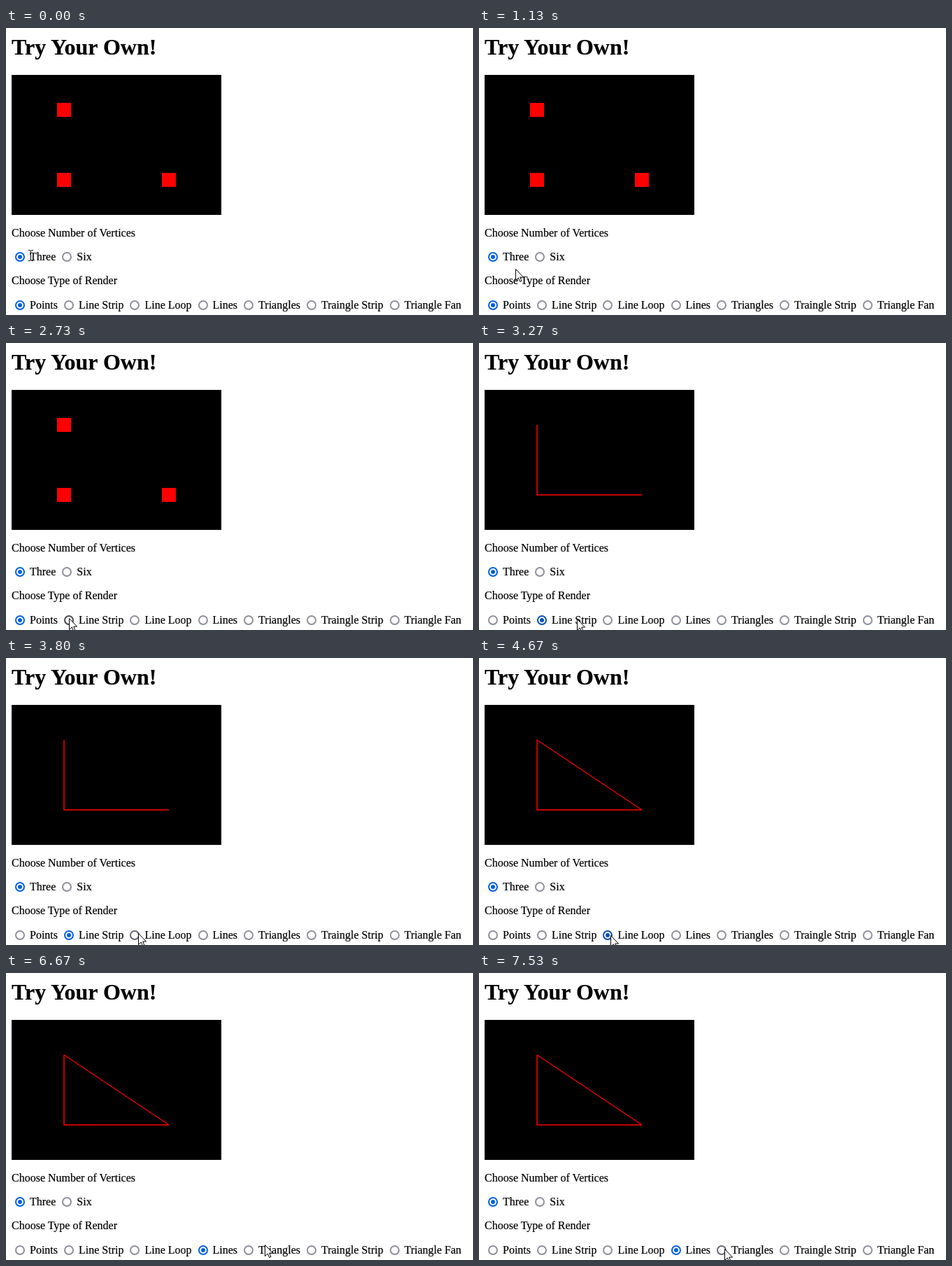
An HTML page for the animation above (8 s loop, 668 by 410 pixels).

```html
<!DOCTYPE html>
<html lang="en">
<head>
<meta charset="utf-8">
<title>Try Your Own!</title>
<style>
  html, body { margin: 0; width: 100%; height: 100%; overflow: hidden; background: #fff; }
  svg { display: block; }
  text { font: 16px "Liberation Serif", "Times New Roman", serif; stroke: #000; stroke-width: .2px; }
  .title { font-size: 32px; font-weight: bold; }
</style>
</head>
<body>
<svg id="stage" width="668" height="410" viewBox="0 0 668 410">
  <text class="title" x="8" y="38">Try Your Own!</text>
  <rect x="8" y="67" width="300" height="200"/>
  <path id="points" fill="#f00" d="M73 107h20v20h-20zM73 207h20v20h-20zM223 207h20v20h-20z"/>
  <path id="strip" fill="none" stroke="#f00" stroke-width="1.5" d="M83 117V217H233"/>
  <path id="diagonal" stroke="#f00" stroke-width="1.1" d="M83 117L233 217"/>
  <text x="8" y="298">Choose Number of Vertices</text>
  <text x="8" y="366">Choose Type of Render</text>
  <g id="radios"></g>
  <path id="beam" fill="none" stroke="#000" d="M-3 -7.5H-1Q0 -7.5 .5 -6.5Q1 -7.5 2 -7.5H4M.5 -7V7M-3 7.5H-1Q0 7.5 .5 6.5Q1 7.5 2 7.5H4"/>
  <path id="arrow" fill="#fff" stroke="#000" d="M.5 .5V16.5L4.3 12.9L6.7 18.4L9 17.4L6.7 12.1H11.6Z"/>
</svg>
<script>
const LOOP = 8000, FPS = 15;
const $ = id => document.getElementById(id);

function add(tag, attrs) {
  const node = document.createElementNS('http://www.w3.org/2000/svg', tag);
  for (const key in attrs) node.setAttribute(key, attrs[key]);
  return $('radios').appendChild(node);
}

// Inline flow: margin, 14px circle, margin, space, label, space
function radioRow(cy, labels) {
  const space = 4;
  let x = 8;
  return labels.map(label => {
    const left = x + 5, cx = Math.round(left) + 7, textX = left + 17 + space;
    const ring = add('circle', { cx, cy, r: 6, fill: '#fff', 'stroke-width': 2 });
    const dot = add('circle', { cx, cy, r: 3 });
    const text = add('text', { x: textX, y: cy + 5 });
    text.textContent = label;
    const right = textX + text.getComputedTextLength();
    x = right + space;
    return { ring, dot, left, right, cx };
  });
}

const idleColors = { idle: '#8f8f9d', hover: '#676774', press: '#484851' };
const checkedColors = { idle: '#0060df', hover: '#0250bb', press: '#054096' };

function paintRadio({ ring, dot }, checked, state) {
  const color = (checked ? checkedColors : idleColors)[state];
  ring.setAttribute('stroke', color);
  dot.setAttribute('fill', checked ? color : 'none');
}

const counts = radioRow(327, ['Three', 'Six']);
const modes = radioRow(396, [
  'Points', 'Line Strip', 'Line Loop', 'Lines', 'Triangles', 'Traingle Strip', 'Triangle Fan'
]);
const [, strip, lineLoop, lines, triangles] = modes;

// The pointer rests between moves; times are in seconds
const moves = [];
const move = (from, to, x, y) => moves.push({ from, to, x, y });
move(0.87, 1.73, strip.cx, 388);
move(1.80, 2.07, strip.cx, 393);
move(3.07, 3.27, strip.cx + 51, 394);
move(3.27, 3.53, lineLoop.cx + 7, 387);
move(3.67, 3.87, lineLoop.cx + 4, 396);
move(4.80, 5.33, lines.cx - 9, 398);
move(5.33, 5.60, lines.cx, 393);
move(6.40, 6.67, triangles.cx + 24, 388);
move(6.67, 7.27, triangles.cx + 8, 389);
move(7.27, 7.53, triangles.cx + 4, 394);

function pointerAt(t) {
  let x = 35, y = 325;
  for (const m of moves) {
    const k = Math.min(1, Math.max(0, (t - m.from) / (m.to - m.from)));
    x += (m.x - x) * k;
    y += (m.y - y) * k;
  }
  return [Math.round(x), Math.round(y)];
}

const PRESS = 2.73, CLICKS = [2.86, 4.66, 6.2];

function render(ms) {
  const t = Math.floor((ms + 4) * FPS / 1000) / FPS + 0.001;
  const [x, y] = pointerAt(t);
  const selected = CLICKS.filter(click => t >= click).length;
  const active = t >= PRESS && t < CLICKS[0] ? 'press' : 'hover';

  counts.forEach((radio, i) => paintRadio(radio, i === 0, 'idle'));
  modes.forEach((radio, i) => {
    const over = y > 389 && x >= radio.left && x <= radio.right;
    paintRadio(radio, i === selected, over ? active : 'idle');
  });

  const show = (id, on) => $(id).setAttribute('visibility', on ? 'visible' : 'hidden');
  show('points', selected === 0);
  show('strip', selected >= 1);
  show('diagonal', selected >= 2);

  const onText = y < 336;
  show('beam', onText);
  show('arrow', !onText);
  $(onText ? 'beam' : 'arrow').setAttribute('transform', `translate(${x} ${y})`);
}

const start = performance.now();
function frame() {
  render((performance.now() - start) % LOOP);
  requestAnimationFrame(frame);
}
frame();
</script>
</body>
</html>
```
